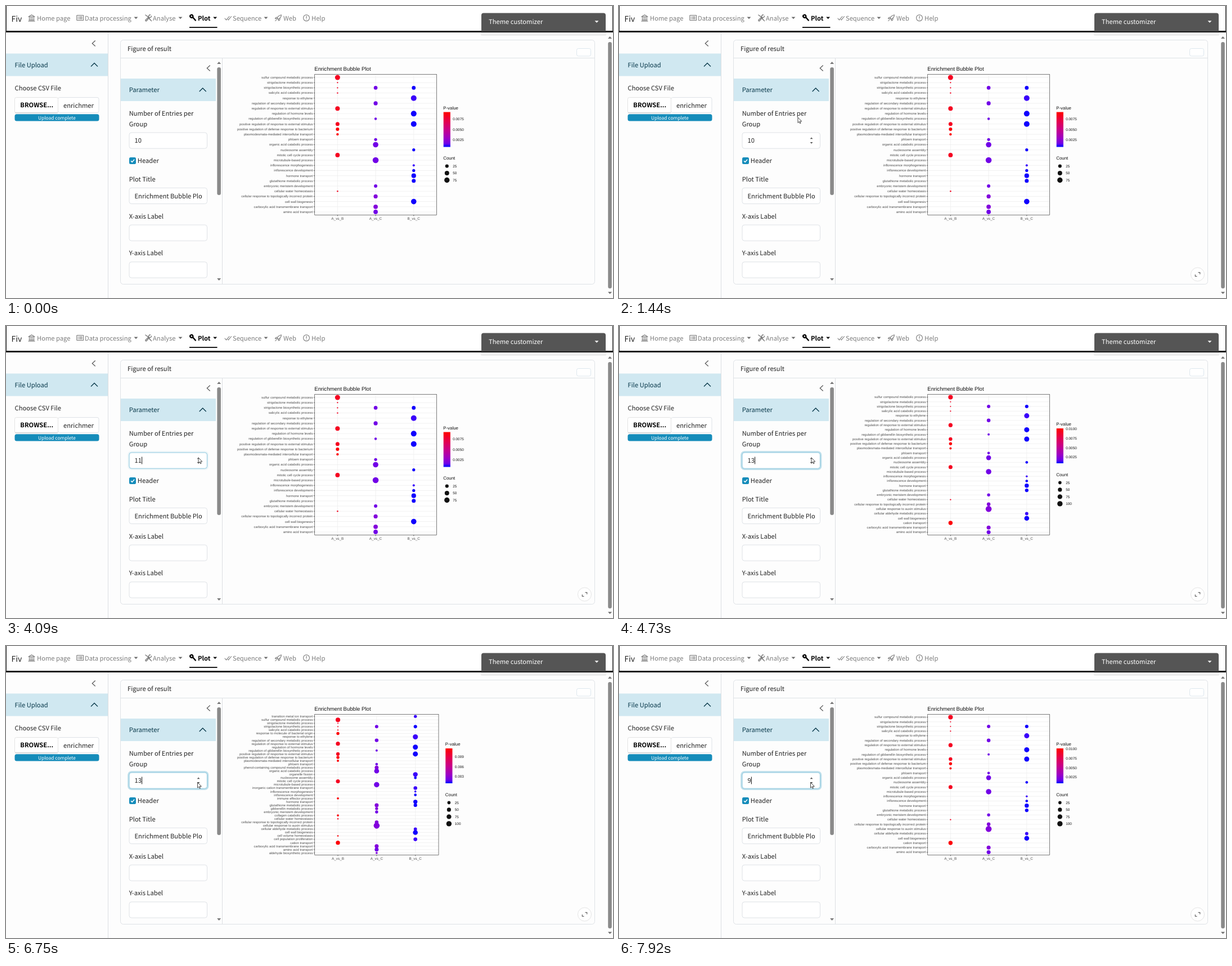
An HTML page for the animation above (8000 ms loop, 1079 px wide and 519 px high).

```html
<!DOCTYPE html>
<html lang="en">
<head>
<meta charset="utf-8">
<title>Enrichment Bubble Plot</title>
<style>
html, body { margin: 0; width: 100%; height: 100%; overflow: hidden; background: #fdfdfd; }
svg { display: block; }
#stage { width: 100vw; height: 100vh; text-rendering: geometricPrecision; }
text { white-space: pre; }
.ui { font: 11.2px "Noto Sans CJK SC", "Noto Sans CJK JP", "Noto Sans CJK", Lato, sans-serif; fill: #222; }
.plot { font: 6.4px "Liberation Sans", Arial, sans-serif; fill: #111; }
.plot .axis { fill: #4d4d4d; }
.plot .row { font-size: 5.8px; text-anchor: end; }
.icon { fill: none; stroke: #777; stroke-width: 1.1; stroke-linecap: round; stroke-linejoin: round; }
</style>
</head>
<body>
<svg id="stage" viewBox="0 0 1079 519" preserveAspectRatio="none">
  <defs><linearGradient id="ramp" x1="0" y1="1" x2="0" y2="0"></linearGradient></defs>
  <g id="page" class="ui"></g>
  <g id="plot" class="plot"></g>
  <g class="ui">
    <rect id="glow" x="217.6" y="223.6" width="141.4" height="31" rx="5.5" fill="none" stroke="#158cba" stroke-opacity=".27" stroke-width="2.8"/>
    <rect id="field" x="219" y="225" width="138.5" height="28.2" rx="4" fill="#fff" stroke="#dee2e6"/>
    <text id="value" x="228.5" y="243.2"></text>
    <rect id="caret" y="232.5" width="1" height="13" fill="#111"/>
    <path id="spinner" d="M339.6 236.2h5l-2.5-2.8zM339.6 242h5l-2.5 2.8z" fill="#555"/>
    <g id="expand">
      <circle cx="1028.5" cy="477" r="12" fill="#fff" stroke="#e4e4e4"/>
      <path d="M1029.5 473.5h3.2v3.2M1027.5 480.5h-3.2v-3.2" fill="none" stroke="#555" stroke-width="1.1"/>
    </g>
  </g>
  <path id="cursor" d="M0 0V9.6L2.2 7.5 3.6 10.8 5.1 10.1 3.7 7H6.8Z" fill="#fff" stroke="#333" stroke-width=".9" stroke-linejoin="round"/>
</svg>
<script>
const LOOP = 8000;
const $ = id => document.getElementById(id);
const text = (x, y, s, attrs = '') => `<text x="${x}" y="${y}" ${attrs}>${s}</text>`;
const rect = (x, y, w, h, attrs = '') => `<rect x="${x}" y="${y}" width="${w}" height="${h}" ${attrs}/>`;
const path = (d, attrs = '') => `<path d="${d}" ${attrs}/>`;
const circle = (x, y, r, attrs = '') => `<circle cx="${x}" cy="${y}" r="${r}" ${attrs}/>`;
const line = (x1, y1, x2, y2, color, w = 1) => path(`M${x1} ${y1}L${x2} ${y2}`, `stroke="${color}" stroke-width="${w}"`);
const icon = (x, d, attrs = '') => path(d, `class="icon" transform="translate(${x} 15)" ${attrs}`);
const triangle = (x, y, color, w = 7, h = 3.6) => path(`M${x - w / 2} ${y - h / 2}h${w}l${-w / 2} ${h}z`, `fill="${color}"`);
const chevronUp = (x, y) => path(`M${x - 6} ${y + 3}l6 -6l6 6`, 'fill="none" stroke="#08384a" stroke-width="1.3"');
const chevronLeft = (x, y) => path(`M${x + 2.7} ${y - 5}l-5.4 5l5.4 5`, 'fill="none" stroke="#555" stroke-width="1.2"');
const input = (x, y, w) => rect(x, y, w, 28.2, 'rx="4" fill="#fff" stroke="#dee2e6"');
const clipped = (x, y, w, s) => `<svg x="${x}" y="${y}" width="${w}" height="27">${text(0, 18, s)}</svg>`;

function navbar() {
  const gray = 'fill="#7d7d7d"', dark = '#1c1c1c';
  const items = [[55, 'Home page'], [140, 'Data processing', 231], [261, 'Analyse', 310],
    [403, 'Sequence', 462], [493, 'Web'], [543, 'Help']];
  return rect(0, 0, 1079, 44, 'fill="#fff"')
    + rect(0, 44, 1079, 3, `fill="${dark}"`) + rect(0, 0, 1, 45, `fill="${dark}"`) + rect(1078, 0, 1, 45, `fill="${dark}"`)
    + text(9.5, 27.5, 'Fiv', 'style="font-size:14px"')
    + items.map(([x, s, caret]) => text(x, 25.7, s, gray) + (caret ? triangle(caret, 21.3, '#666') : '')).join('')
    + text(341, 25.7, 'Plot', 'font-weight="700" style="fill:#000"') + triangle(371.7, 21.3, '#000')
    + rect(326, 37, 49.5, 2, `fill="${dark}"`)
    + icon(39.5, 'M.5 4L6 .8 11.5 4ZM.5 12.2h11M1.3 10.4h9.4M2 5v5M4.7 5v5M7.3 5v5M10 5v5')
    + icon(125.5, 'M1 1.5h10.5q.7 0 .7 .7v7.6q0 .7-.7 .7H1q-.7 0-.7-.7V2.200q0-.7 .7-.7M2.500 4h.8M5 4h5M2.500 6h.8M5 6h5M2.500 8h.8M5 8h5')
    + icon(247, 'M1 1l3.500 2.500L9 8.500M8 8l3.500 3.500M11.500 3a2.600 2.600 0 0 1-3.500 2.300L3 11.300a1 1 0 0 1-1.800-1.500L6.800 4.500A2.600 2.600 0 0 1 9.500 .8', 'style="stroke-width:1.4"')
    + icon(327, 'M.8 1.500a2.600 2.600 0 0 0 4 3.300L9.800 10.500M2.500 .8a2.600 2.600 0 0 1 2.800 3.300', 'style="stroke:#000;stroke-width:2.4"')
    + icon(388.5, 'M.5 7l2.500 2.800L8.500 3.500M6 9.200l.7 .6L12 3.500')
    + icon(478, 'M4 7q1.500-5 7.500-6.200Q11 6.500 5.500 8.500ZM4 5L1.500 5.500.5 7.500h3M6.500 8v3l2-1 .7-3M3 9L.8 11.500')
    + icon(528, 'M6 .7a5.500 5.500 0 1 0 .01 0M6 3v3.800M6 8.700v.3')
    + rect(844, 45, 223, 8, 'rx="2" fill="#000" opacity=".06"')
    + path('M845 45V16.500q0-4 4-4h213q4 0 4 4V45z', 'fill="#555"')
    + text(858, 32.3, 'Theme customizer', 'style="fill:#fff"') + triangle(1050, 28, '#fff');
}

function uploadPanel() {
  return line(181.5, 47, 181.5, 519, '#dcdfe2') + chevronLeft(156, 66.5)
    + rect(0, 84.5, 181, 40, 'fill="#d0e8f1"') + text(15.5, 109, 'File Upload', 'style="fill:#08384a"') + chevronUp(157, 104.5)
    + text(15.5, 150.3, 'Choose CSV File')
    + rect(92.5, 162.5, 72.5, 27, 'rx="3" fill="#fff" stroke="#dee2e6"') + clipped(102, 163, 54, 'enrichment.csv')
    + rect(15.5, 162.5, 77, 27.500, 'rx="3" fill="#fff" stroke="#e3e3e3"') + rect(16, 189, 76, 1.5, 'fill="#d4d4d4"')
    + text(25.3, 180.2, 'BROWSE...', 'font-weight="700" style="fill:#000"')
    + rect(15.5, 192.3, 150, 12.2, 'rx="3.500" fill="#158cba"')
    + text(90.5, 201.5, 'Upload complete', 'text-anchor="middle" style="fill:#fff;font-size:8.4px"');
}

function scrollbar(x, top, bottom, thumbTop, thumbBottom) {
  return triangle(x, top, '#777', 7, -4) + triangle(x, bottom, '#777', 7, 4)
    + rect(x - 3.3, thumbTop, 6.6, thumbBottom - thumbTop, 'rx="3.3" fill="#8a8a8a"');
}

function resultCard() {
  return rect(203.5, 60.5, 843, 434, 'rx="5" fill="#fdfdfd" stroke="#dee2e6"')
    + line(204, 92.5, 1046, 92.5, '#dee2e6') + text(216, 80.2, 'Figure of result')
    + rect(1014.5, 75.5, 25, 13.5, 'rx="3" fill="#fff" stroke="#dde7ee"')
    + line(384.5, 93, 384.5, 494, '#dcdfe2') + chevronLeft(360, 110.5)
    + rect(204, 129, 169, 40, 'fill="#d0e8f1"') + text(218.7, 153.3, 'Parameter', 'style="fill:#08384a"') + chevronUp(349.7, 149)
    + text(218.7, 194.7, 'Number of Entries per') + text(218.7, 213.6, 'Group')
    + rect(219, 269, 12, 12, 'rx="2.500" fill="#158cba"')
    + path('M222 275.2l2.200 2.200 4-4.600', 'fill="none" stroke="#fff" stroke-width="1.500"')
    + text(233.8, 279.3, 'Header')
    + ['Plot Title', 'X-axis Label', 'Y-axis Label']
      .map((s, i) => text(218.7, 311.7 + i * 65.8, s) + input(219, 323.3 + i * 65.8, 138.5)).join('')
    + clipped(228.5, 323.800, 120, 'Enrichment Bubble Plot')
    + scrollbar(378.6, 101, 486, 109, 336);
}

// Each dot: comparison column, radius, and the entry count at which it appears (10 if absent).
// Lower case marks a higher p-value within the column.
const ROWS = `transition metal ion transport|c3@14
sulfur compound metabolic process|A4.5
strigolactone metabolic process|A1.1
strigolactone biosynthetic process|A1.1 B3.3 C3.4
salicylic acid catabolic process|A1.2
response to molecule of bacterial origin|a3@13
response to ethylene|c5
regulation of secondary metabolic process|B3.6
regulation of response to external stimulus|A4
regulation of hormone levels|C5
regulation of gibberellin biosynthetic process|B2.2
positive regulation of response to external stimulus|A3.5 C5
positive regulation of defense response to bacterium|a3
plasmodesmata-mediated intercellular transport|a2.2
phloem transport|B2.6
phenol-containing compound metabolic process|b3.8@12
organic acid catabolic process|B4.8
organelle fission|c4.6@12
nucleosome assembly|C2.6
mitotic cell cycle process|A3.9
microtubule-based process|B5.3
inorganic cation transmembrane transport|c3.6@13
inflorescence morphogenesis|c2
inflorescence development|C2.6
immune effector process|a2.1@12
hormone transport|C4.1
glutathione metabolic process|b3.9@14 C3.5
gibberellin metabolic process|b2.9@13
embryonic meristem development|B3
collagen catabolic process|a2.1@14
cellular water homeostasis|A1.3
cellular response to topologically incorrect protein|b3.6
cellular response to auxin stimulus|b5.9@11
cellular aldehyde metabolic process|c3.2@11
cell wall biogenesis|C4.8
cell volume homeostasis|a1.5@15
cell population proliferation|c3.7@15
cation transport|a4.1@11
carboxylic acid transmembrane transport|b3.9
amino acid transport|B3.9
aldehyde biosynthetic process|b2.2@15`.split('\n').map(row => {
  const [name, dots] = row.split('|');
  return { name, dots: dots.split(' ').map(d => {
    const [r, from = 10] = d.slice(1).split('@').map(Number);
    return { kind: d[0], column: 'ABC'.indexOf(d[0].toUpperCase()), r, from };
  }) };
});
const PVALUE = { A: .9, a: .985, B: .1, b: .15, C: .0005, c: .015 };
const rampColor = p => `rgb(${255 * p ** .35 | 0},0,${255 * (1 - p) ** .9 | 0})`;

function legend(n, x) {
  const few = n < 11, top = few ? 188.5 : 182;
  const [first, step, ticks] = few ? [200.7, 18.7, ['0.0075', '0.0050', '0.0025']]
    : n > 14 ? [197, 17.3, ['0.009', '0.006', '0.003']]
    : [n > 12 ? 186 : 183, n > 12 ? 16 : 16.7, ['0.0100', '0.0075', '0.0050', '0.0025']];
  const radii = few ? [3.1, 4, 4.7] : [2.8, 3.6, 4.2, 4.7];
  const countY = few ? 284.5 : 278.4;
  return text(x, top - 5, 'P-value', 'style="font-size:7.9px"') + rect(x + .5, top, 12.2, 62, 'fill="url(#ramp)"')
    + ticks.map((s, i) => text(x + 17, first + i * step + 2.3, s)).join('')
    + text(x, countY - 11.4, 'Count', 'style="font-size:7.9px"')
    + radii.map((r, i) => circle(x + 6.6, countY + i * 12.5, r) + text(x + 17, countY + i * 12.5 + 2.3, 25 * (i + 1))).join('');
}

function bubblePlot(n) {
  const left = 548.7, top = 121.5, height = 250, width = n > 14 ? 220.3 : 216.7;
  const rows = ROWS.map(({ name, dots }) => ({ name, dots: dots.filter(d => d.from <= n) })).filter(r => r.dots.length);
  const stepX = width / 3.2, stepY = height / (rows.length + .2);
  const colX = i => left + stepX * (i + .6), rowY = i => top + stepY * (i + .6);
  let grid = '', labels = '', dots = '';
  ['A_vs_B', 'A_vs_C', 'B_vs_C'].forEach((s, i) => {
    grid += line(colX(i), top, colX(i), top + height, '#ebebeb', .7);
    labels += line(colX(i), top + height, colX(i), top + height + 2, '#333', .7)
      + text(colX(i), 380, s, 'class="axis" text-anchor="middle"');
  });
  rows.forEach((row, i) => {
    const y = rowY(i);
    grid += line(left, y, left + width, y, '#ebebeb', .7);
    labels += line(left - 2, y, left, y, '#333', .7) + text(545.3, y + 1.9, row.name, 'class="axis row"');
    for (const d of row.dots)
      dots += circle(colX(d.column), y, d.r * (n > 10 ? .9 : 1), `fill="${rampColor(PVALUE[d.kind])}"`);
  });
  return rect(left, top, width, height, 'fill="#fff"') + grid + dots
    + rect(left, top, width, height, 'fill="none" stroke="#444" stroke-width=".7"') + labels
    + text(548.3, 115.3, 'Enrichment Bubble Plot', 'style="font-size:9.6px"')
    + legend(n, left + width + 11.8);
}

$('ramp').innerHTML = [0, .1, .25, .5, .75, 1].map(p => `<stop offset="${p}" stop-color="${rampColor(p)}"/>`).join('');
$('page').innerHTML = navbar() + uploadPanel() + resultCard() + scrollbar(1073.5, 56, 510, 64, 502);

const VALUES = [[0, 10], [4090, 11], [4460, 12], [4730, 13], [5020, 14], [5300, 15],
  [6420, 14], [6750, 13], [7120, 12], [7370, 11], [7600, 10], [7840, 9]];
const PLOTS = [[0, 10], [4550, 11], [4830, 12], [5120, 13], [5440, 14], [5720, 15],
  [6890, 14], [7230, 13], [7510, 12], [7920, 11]];
const CURSOR = [[190, 150, -14], [970, 204, 193], [1440, 318, 198], [1810, 309, 207],
  [2350, 344, 238], [2660, 338, 240.5], [2720, 338, 240.5], [3000, 341, 235], [3750, 342, 234],
  [5950, 342, 234], [6180, 342, 236], [6330, 340, 246], [6420, 340.5, 242.5], [LOOP, 340.5, 242.5]];

const current = (steps, t) => steps.findLast(s => s[0] <= t);
const clamp = x => Math.min(1, Math.max(0, x));

function cursorAt(t) {
  const i = Math.max(1, CURSOR.findIndex(k => k[0] > t));
  const [t0, x0, y0] = CURSOR[i - 1], [t1, x1, y1] = CURSOR[i];
  const u = clamp((t - t0) / (t1 - t0)), e = u * u * (3 - 2 * u);
  return [x0 + (x1 - x0) * e, y0 + (y1 - y0) * e];
}

let shownPlot;
function draw(t) {
  const [changed, value] = current(VALUES, t), n = current(PLOTS, t)[1];
  if (n !== shownPlot) $('plot').innerHTML = bubblePlot(shownPlot = n);
  const focus = clamp((t - 4060) / 120);
  $('glow').style.opacity = focus;
  $('field').setAttribute('stroke', focus ? '#8ac6dd' : '#dee2e6');
  $('value').textContent = value;
  $('caret').setAttribute('x', 228.7 + 6.2 * String(value).length);
  $('caret').style.opacity = +(focus > 0 && (t - changed) % 1000 < 500);
  $('spinner').style.opacity = +(t >= 1070);
  $('expand').style.opacity = clamp((t - 850) / 120);
  $('cursor').setAttribute('transform', `translate(${cursorAt(t)})`);
}

const start = performance.now();
function tick() {
  draw((performance.now() - start) % LOOP);
  requestAnimationFrame(tick);
}
tick();
</script>
</body>
</html>
```
